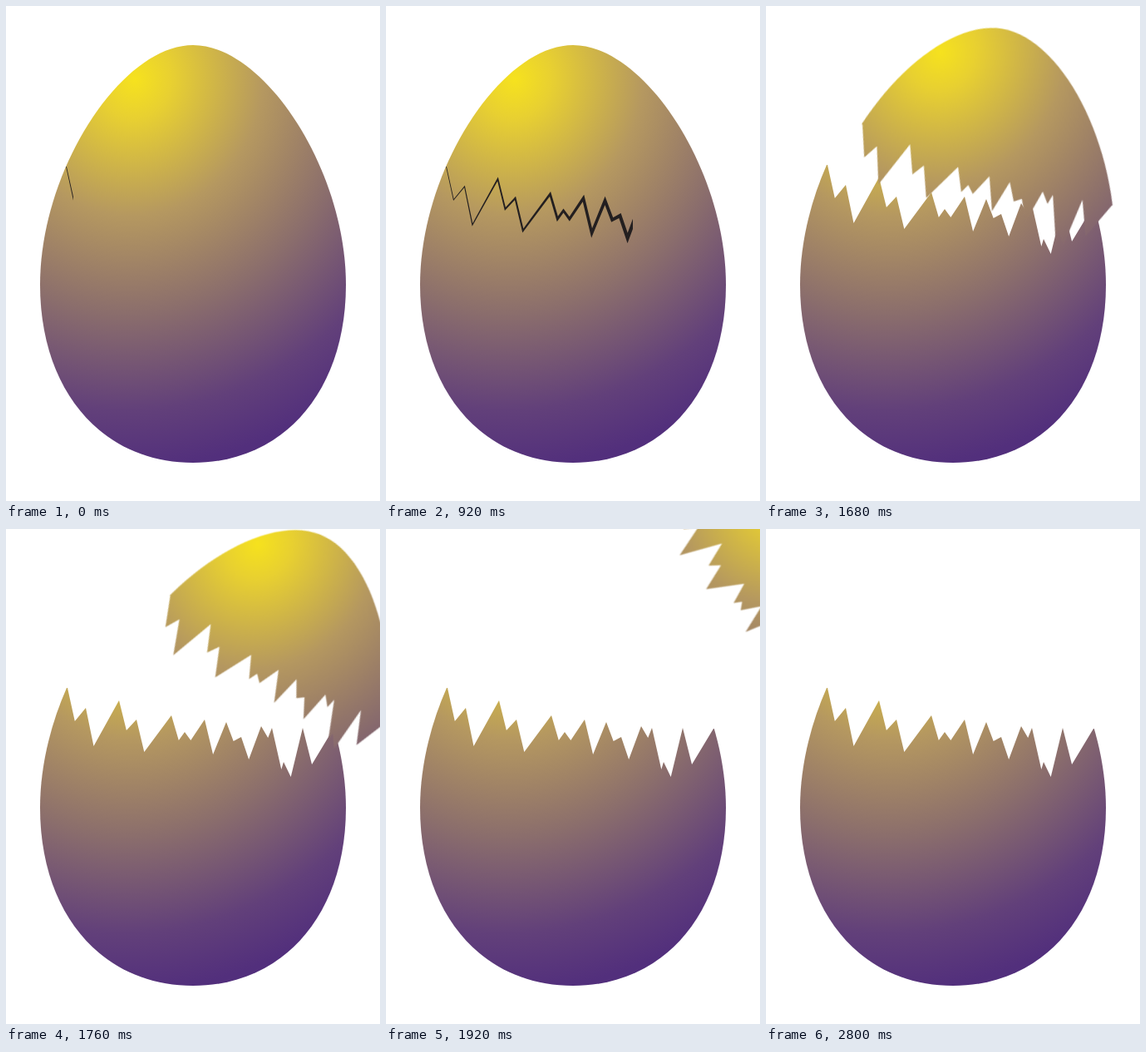
An HTML page that plays this animation: 450x595 px, repeating every 2840 ms.

```html
<!DOCTYPE html>
<html lang="en">
<head>
<meta charset="utf-8">
<title>Cracking egg</title>
<style>
  html, body { margin: 0; height: 100%; overflow: hidden; background: #fff; }
  svg { display: block; width: 100%; height: 100%; }
  #wipe, #whole, #base, #lid, #fly { animation: 2840ms step-end infinite; }

  #wipe { animation-name: wipe; }
  #whole { animation-name: whole; }
  #base { animation-name: base; }
  #lid { animation-name: lid; }
  #fly { animation-name: fly; transform-origin: 234px 172px; }

  /* the crack is uncovered from left to right in hard, even steps */
  @keyframes wipe {
    0% { transform: translateX(81px); animation-timing-function: steps(3); }
    12.67% { transform: translateX(182px); }
    14.08% { transform: translateX(182px); animation-timing-function: steps(3); }
    26.76% { transform: translateX(246px); }
    32.39% { transform: translateX(297px); animation-timing-function: steps(3); }
    49.29% { transform: translateX(341px); animation-timing-function: steps(2); }
    54.92%, 100% { transform: translateX(400px); }
  }
  @keyframes whole {
    57.74%, 100% { visibility: hidden; }
  }
  @keyframes base {
    0% { visibility: hidden; }
    57.74%, 100% { visibility: visible; }
  }
  @keyframes lid {
    0%, 70.42%, 100% { visibility: hidden; }
    57.74% { visibility: visible; }
  }
  @keyframes fly {
    0%, 57.74% {
      transform: translate(4px, -7.5px) rotate(3.3deg) scale(.9967);
      animation-timing-function: steps(9);
    }
    70.42%, 100% { transform: translate(319px, -147px) rotate(57.3deg) scale(.8014); }
  }
</style>
</head>
<body>
<svg viewBox="0 0 450 595">
  <defs>
    <radialGradient id="shade" gradientUnits="userSpaceOnUse" cx="0" cy="0" r="1"
      gradientTransform="translate(155 88) rotate(14) scale(440 470)">
      <stop offset="0" stop-color="#f6e21e"/>
      <stop offset=".1" stop-color="#e8d031"/>
      <stop offset=".35" stop-color="#b59860"/>
      <stop offset=".6" stop-color="#8b6e6c"/>
      <stop offset=".85" stop-color="#62407a"/>
      <stop offset="1" stop-color="#522f7c"/>
    </radialGradient>
    <path id="egg" fill="url(#shade)" d="M225 47C311 47 409 197 409 335C409 463 334 549 225 549
      S41 463 41 335C41 197 139 47 225 47Z"/>
    <clipPath id="lower"><polygon id="lowerArea"/></clipPath>
    <clipPath id="upper"><polygon id="upperArea"/></clipPath>
    <clipPath id="shown"><rect id="wipe" x="-450" width="450" height="595"/></clipPath>
  </defs>
  <g id="whole">
    <use href="#egg"/>
    <g clip-path="url(#shown)"><polygon id="crack" fill="#231f20"/></g>
  </g>
  <g id="base"><use href="#egg" clip-path="url(#lower)"/></g>
  <g id="lid"><g id="fly"><use href="#egg" clip-path="url(#upper)"/></g></g>
</svg>
<script>
  // Peaks of the broken edge: x, y and the drop into the notch just right of it
  const peaks = [
    [74, 191, 40], [96, 215, 46], [136, 206, 36], [157, 229, 39], [199, 224, 30],
    [215, 244, 10], [239, 229, 42], [265, 232, 23], [283, 250, 27], [307, 237, 14],
    [320, 239, 50], [334, 280, 18], [357, 239, 44]
  ];
  const notch = (x, drop) => x + 5 + drop / 12 + x / 150;
  const edge = peaks.flatMap(([x, y, drop]) => [[x, y], [notch(x, drop), y + drop]]);
  edge.push([394, 240]);

  const setPoints = (id, pts) =>
    document.getElementById(id).setAttribute('points', pts.join(' '));
  // Everything on one side of the edge, out to the given stage border
  const side = y => [...edge, [450, 240], [450, y], [0, y], [0, 191]];

  setPoints('lowerArea', side(595));
  setPoints('upperArea', side(0));

  // Mitred outline of a polyline whose width varies along x
  function taper(pts, width) {
    const normals = pts.slice(1).map(([x, y], i) => {
      const dx = x - pts[i][0], dy = y - pts[i][1], len = Math.hypot(dx, dy);
      return [-dy / len, dx / len];
    });
    const left = [], right = [];
    pts.forEach(([x, y], i) => {
      const a = normals[Math.max(i - 1, 0)];
      const b = normals[Math.min(i, normals.length - 1)];
      const mx = a[0] + b[0], my = a[1] + b[1];
      const k = width(x) / 2 / (mx * a[0] + my * a[1]);
      left.push([x + mx * k, y + my * k]);
      right.unshift([x - mx * k, y - my * k]);
    });
    return [...left, ...right];
  }

  const lineWidth = x => Math.min(0.8 + (x - 72) * 0.0155, 0.7 + (392 - x) * 0.07);
  setPoints('crack', taper(edge.map(([x, y]) => [x - 1.5, y + 2]), lineWidth));
</script>
</body>
</html>
```
